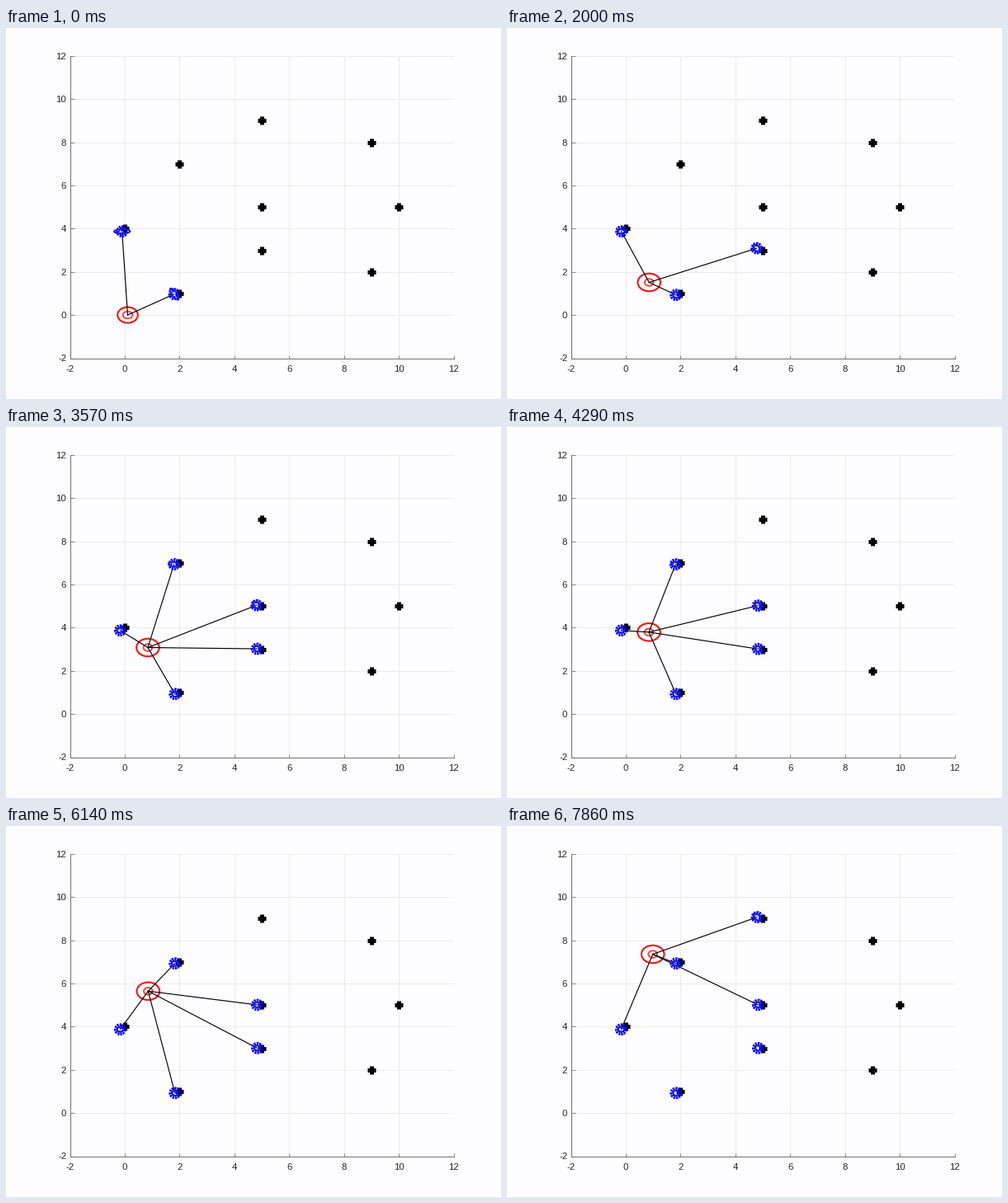
Write a matplotlib script that moves like this. It is 600 by 450 pixels and loops after 8 s.

```python
import numpy as np
import matplotlib.pyplot as plt
from matplotlib.animation import FuncAnimation
from matplotlib.patches import Ellipse

LOOP, TICK, STEPS = 8000, 40, 56     # ms, ms, filter steps per loop
LEFT, TOP, WIDE, HIGH = 77.5, 33.75, 465, 366.75
SX, SY = WIDE / 14, HIGH / 14        # pixels per unit
PT = 0.72                            # points per pixel at 100 dpi
SENSOR = 5.0
PAPER = "#fdfcfe"
TURN = 8                             # steps in the opening quarter turn

# position and sideways error of the first estimate
NEAR = [(0, 4, -0.07), (2, 1, 0.05), (5, 3, 0.38), (2, 7, 0.09), (5, 5, 0.1), (5, 9, 0.24)]
FAR = [(9, 8), (10, 5), (9, 2)]


def robot_at(i):
    if i < TURN:
        turn = i / TURN * np.pi / 2
        return 0.107 + 0.73 * np.sin(turn), 0.655 * (1 - np.cos(turn))
    sway = 0.11 * (i / 55) ** 2 * np.cos(2 * np.pi * (i - 37) / 19.5)
    return 0.835 + 0.001 * i + sway, 0.655 + 0.1425 * (i - TURN)


class Landmark:
    def __init__(self, x, y, slip):
        self.x, self.y, self.slip = x, y, slip
        self.first = next(i for i in range(STEPS) if self.in_range(i))
        rx, ry = robot_at(self.first)
        self.across = np.arctan2(y - ry, x - rx) + np.pi / 2
        self.ray = ax.plot([], [], color="black", lw=1.15 * PT, zorder=4)[0]
        self.gear = ring("#0505f0", 5, 5, ls=(0, (0.4, 0.16)), capstyle="butt")
        self.spread = ring("#1818f4", 2, 5)

    def in_range(self, i):
        rx, ry = robot_at(i)
        return np.hypot(self.x - rx, self.y - ry) < SENSOR

    def update(self, i):
        age = i - self.first
        self.gear.set_visible(age >= 0)
        self.spread.set_visible(age >= 0)
        self.ray.set_visible(self.in_range(i))
        if age < 0:
            return
        # a fixed, slightly rotated offset plus an error that fades with sightings
        error = self.slip * np.exp(-age / 6)
        spot = (self.x - 0.168 + error * np.cos(self.across),
                self.y - 0.13 + 0.027 * self.x + error * np.sin(self.across))
        self.ray.set_data(*zip(robot_at(i), spot))
        resize(self.gear, spot, 4.9 / SX, 4.9 / SY)
        resize(self.spread, spot, 0.12 + 0.17 * np.exp(-age / 8), 0.1,
               np.degrees(self.across))


def ring(color, width, z, **style):
    return ax.add_patch(Ellipse((0, 0), 1, 1, fill=False, ec=color, lw=width * PT,
                                zorder=z, **style))


def resize(patch, center, rx, ry, angle=0):
    patch.set(center=center, width=2 * rx, height=2 * ry, angle=angle)


fig = plt.figure(figsize=(6, 4.5), dpi=100, facecolor=PAPER)
ax = fig.add_axes([LEFT / 600, 1 - (TOP + HIGH) / 450, WIDE / 600, HIGH / 450],
                  facecolor=PAPER)
marks = range(-2, 13, 2)
ax.set(xlim=(-2, 12), ylim=(-2, 12))
ax.set_xticks(marks, [str(v) for v in marks])
ax.set_yticks(marks, [str(v) for v in marks])
ax.set_axisbelow(True)
ax.grid(color="#e7e6e8", lw=0.8 * PT)
ax.tick_params(direction="in", length=4.5 * PT, width=0.8 * PT, color="#707070")
ax.tick_params(axis="x", pad=8.3 * PT)
ax.tick_params(axis="y", pad=4.3 * PT)
for label in ax.get_xticklabels() + ax.get_yticklabels():
    label.set(family="Liberation Sans", size=8.2, color="#262626")
ax.spines[["top", "right"]].set_visible(False)
ax.spines[["left", "bottom"]].set(color="#666666", linewidth=0.9 * PT)

crosses = [(x, y) for x, y, _ in NEAR] + FAR
ax.plot(*zip(*crosses), "+", color="black", ms=10.5 * PT, mew=5 * PT, zorder=2)

outer = ring("#f01818", 2.1, 3)
inner = ring("#f84a4a", 2, 3)
landmarks = [Landmark(*spec) for spec in NEAR]


def draw(n):
    i = int((n + 0.75) * TICK * STEPS / LOOP)
    settle = min(i / TURN, 1)
    resize(outer, robot_at(i), 0.37 + 0.045 * settle, 0.365 + 0.045 * settle)
    resize(inner, robot_at(i), 0.175 - 0.015 * settle, 0.165)
    for mark in landmarks:
        mark.update(i)
    return []


anim = FuncAnimation(fig, draw, frames=LOOP // TICK, init_func=lambda: draw(0),
                     interval=TICK, repeat=True, repeat_delay=0, blit=False)
plt.show()
```
